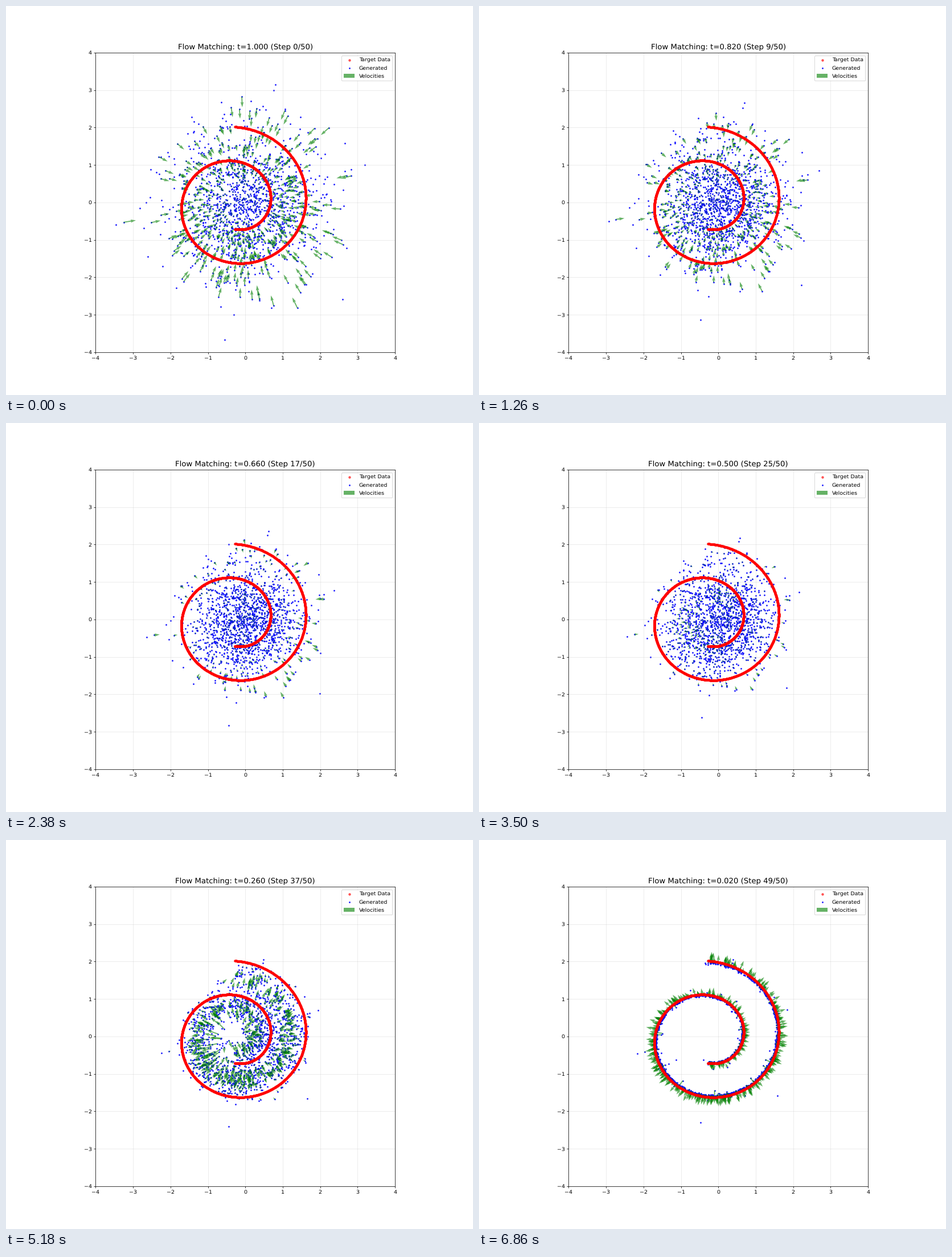
Write a matplotlib script that moves like this. It is 820x683 px and loops after 7000 ms.

```python
import numpy as np
import matplotlib.pyplot as plt
from matplotlib.animation import FuncAnimation

plt.rcParams["font.family"] = "DejaVu Sans"
plt.rcParams["text.hinting"] = "none"

STEPS = 50
DT = 1 / STEPS
COUNT = 1600
ARROWS = 700


def spiral(n):
    """Two turns of a swiss roll, shifted and scaled to unit spread."""
    a = np.linspace(1.5 * np.pi, 4.5 * np.pi, n)
    return np.column_stack([(a * np.cos(a) - 1.87) / 6.64,
                            (a * np.sin(a) - 0.185) / 6.91])


def flow(x, t, data):
    """Velocity that carries the points from noise towards the data."""
    d2 = ((x[:, None] - (1 - t) * data) ** 2).sum(axis=2)
    d2 -= d2.min(axis=1, keepdims=True)
    w = np.exp(-d2 / (2 * ((0.88 * t) ** 2 + 0.06 ** 2)))
    goal = w @ data / w.sum(axis=1, keepdims=True)
    noise = (x - (1 - t) * goal) / t
    # A limited pull leaves a few stragglers between the arms
    size = np.linalg.norm(noise, axis=1, keepdims=True)
    noise *= np.minimum(1, (1.8 + 1.7 * t) / np.maximum(size, 1e-9))
    return goal - noise


def simulate():
    data = spiral(400)
    x = np.random.default_rng(7).standard_normal((COUNT, 2))
    path = []
    for k in range(STEPS):
        v = flow(x, 1 - k * DT, data)
        path.append((x, v))
        x = x + v * DT
    return path


path = simulate()
dpi = 820 / 12
fig, ax = plt.subplots(figsize=(820.001 / dpi, 683.001 / dpi), dpi=dpi)
ax.set_aspect("equal")
ax.set_xlim(-4, 4)
ax.set_ylim(-4, 4)
ax.grid(True, alpha=0.3)

x0, v0 = path[0]
ax.scatter(*spiral(2000).T, s=13, c="red", alpha=0.6, label="Target Data",
           zorder=3)
dots = ax.scatter(*x0.T, s=4, c="blue", alpha=0.8, label="Generated")
arrows = ax.quiver(*x0[:ARROWS].T, *v0[:ARROWS].T, color="green", alpha=0.6,
                   scale_units="xy", scale=10, width=0.0035,
                   label="Velocities")
ax.legend(loc="upper right", labelspacing=0.58).set_zorder(5)
title = ax.set_title("", fontsize=14)


def draw(k):
    x, v = path[k]
    dots.set_offsets(x)
    arrows.set_offsets(x[:ARROWS])
    arrows.set_UVC(*v[:ARROWS].T)
    title.set_text(f"Flow Matching: t={1 - k * DT:.3f} (Step {k}/{STEPS})")
    return dots, arrows, title


anim = FuncAnimation(fig, draw, frames=STEPS, interval=140, repeat=True,
                     repeat_delay=0, blit=False)
plt.show()
```
